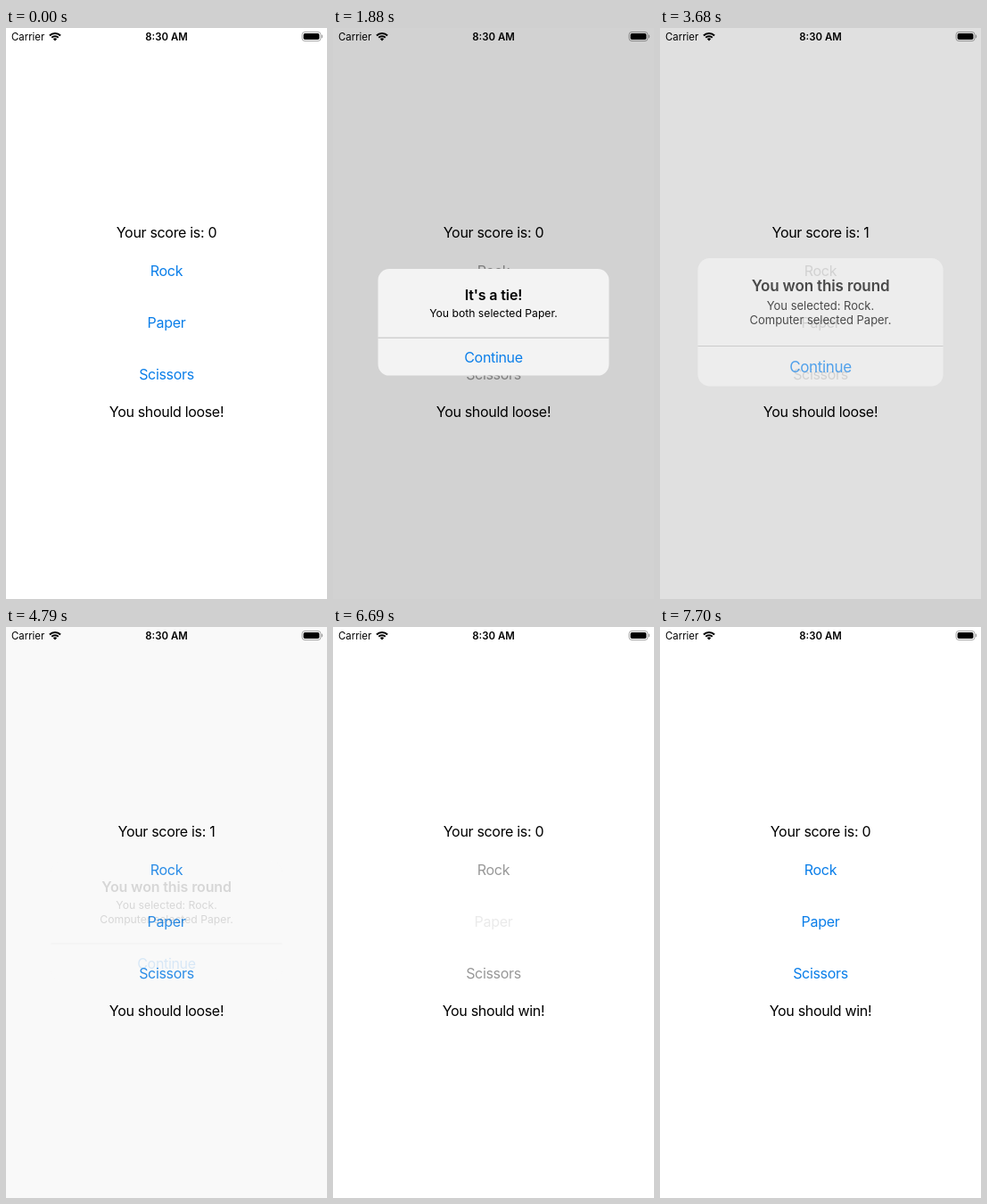
Animation, 360 px wide and 640 px high, one loop 7.78 s. Source, as an HTML page with a canvas:

```html
<!DOCTYPE html>
<html lang="en">
<head>
<meta charset="utf-8">
<title>Rock Paper Scissors</title>
<style>
  html, body { margin: 0; width: 100%; height: 100%; overflow: hidden; background: #fff; }
  canvas { display: block; width: 360px; height: 640px; }
</style>
</head>
<body>
<canvas id="stage"></canvas>
<script>
const W = 360, H = 640, MID = W / 2, LOOP = 7780;
const BLUE = '#0a7ee9', GREY = '#989898';
const FAMILY = 'Inter, "Liberation Sans", sans-serif';
const DIM = 0.176;
const SHOW_RATE = 0.0222, HIDE_RATE = 0.026, HIDE_LEAD = 28;
const canvas = document.getElementById('stage');
const ctx = canvas.getContext('2d');
const dpr = window.devicePixelRatio || 1;
canvas.width = W * dpr;
canvas.height = H * dpr;

const buttons = [['Rock', 277.6], ['Paper', 335.6], ['Scissors', 393.6]];
const tie = { title: "It's a tie!", lines: ['You both selected Paper.'] };
const won = { title: 'You won this round', lines: ['You selected: Rock.', 'Computer selected Paper.'] };
const lost = { title: 'You lost this round', lines: ['You selected: Scissors.', 'Computer selected Paper.'] };

// show and hide are [first step, last step, number of steps]
const rounds = [
  { pick: 1, press: 1240, show: [1540, 1880, 4], hide: [2560, 2990, 5], score: 0, alert: tie },
  { pick: 0, press: 3460, show: [3570, 4000, 5], hide: [4570, 4890, 4], score: 1, alert: won },
  { pick: 2, press: 5230, show: [5330, 5750, 5], hide: [5950, 6280, 4], score: 0, alert: lost },
  { pick: 1, press: 6580, show: [6690, 7100, 5], hide: [7250, 7700, 5], score: 0, alert: tie }
];
const GOAL_CHANGE = 6280;

// Critically damped spring from 0 to 1
function spring(ms, rate) {
  const x = Math.max(0, ms) * rate;
  return 1 - (1 + x) * Math.exp(-x);
}

function stepOf(t, [from, to, count]) {
  const size = (to - from) / (count - 1);
  const index = Math.min(count - 1, Math.floor((t - from) / size + 1e-6));
  return { size, index, last: index === count - 1 };
}

function stateAt(t) {
  const s = { score: 0, goal: t < GOAL_CHANGE ? 'loose' : 'win', tint: BLUE,
              pressed: -1, alert: null, level: 0, scale: 1, held: false };
  for (const r of rounds) {
    if (t < r.press) break;
    if (t < r.show[0]) {
      s.pressed = r.pick;
      break;
    }
    s.score = r.score;
    if (t < r.hide[0]) {
      const { size, index } = stepOf(t, r.show);
      const fromEnd = r.show[2] - 1 - index;
      s.level = fromEnd ? spring((4 - fromEnd) * size, SHOW_RATE) : 1;
      s.scale = 1 + 0.2 * (1 - s.level);
      s.tint = GREY;
      s.alert = r.alert;
      if (s.level === 0) s.pressed = r.pick;
      break;
    }
    const { size, index, last } = stepOf(t, r.hide);
    if (last) continue;
    s.alert = r.alert;
    s.held = index === 0;
    s.tint = s.held ? GREY : BLUE;
    s.level = s.held ? 1 : 1 - spring((index - 1) * size + HIDE_LEAD, HIDE_RATE);
    break;
  }
  return s;
}

function text(str, y, { x = MID, size = 16, weight = 400, color = '#000', track = 0, align = 'center' } = {}) {
  ctx.font = `${weight} ${size}px ${FAMILY}`;
  ctx.letterSpacing = `${track * size}px`;
  ctx.textAlign = align;
  ctx.fillStyle = color;
  ctx.fillText(str, x, y);
}

function roundRect(x, y, w, h, r) {
  ctx.beginPath();
  ctx.roundRect(x, y, w, h, r);
}

function statusBar() {
  text('Carrier', 14, { x: 6, size: 11.4, align: 'left' });
  text('8:30 AM', 14, { size: 11.4, weight: 600 });

  const a = -Math.PI * 0.75, b = -Math.PI * 0.25;
  ctx.strokeStyle = ctx.fillStyle = '#000';
  ctx.lineWidth = 2;
  for (const r of [8.6, 5.3]) {
    ctx.beginPath();
    ctx.arc(55, 14.5, r, a, b);
    ctx.stroke();
  }
  ctx.beginPath();
  ctx.moveTo(55, 14.5);
  ctx.arc(55, 14.5, 3.1, a, b);
  ctx.fill();

  ctx.strokeStyle = ctx.fillStyle = '#a6a6a6';
  ctx.lineWidth = 1;
  roundRect(332, 4.5, 21, 10, 3);
  ctx.stroke();
  roundRect(353.8, 7.6, 1.4, 3.8, [0, 1.4, 1.4, 0]);
  ctx.fill();
  ctx.fillStyle = '#000';
  roundRect(333.6, 6, 17.8, 7, 1.8);
  ctx.fill();
}

function drawAlert({ alert, level, scale, held }) {
  const w = 259, h = 104 + 15.5 * alert.lines.length;
  const left = -w / 2, top = -h / 2, line = top + h - 42.5;
  ctx.save();
  ctx.globalAlpha = level;
  ctx.translate(MID, 329.8);
  ctx.scale(scale, scale);
  ctx.fillStyle = '#f3f3f3';
  roundRect(left, top, w, h, 12.5);
  ctx.fill();
  if (held) {
    ctx.fillStyle = '#e2e2e2';
    roundRect(left, line, w, 42.5, [0, 0, 12.5, 12.5]);
    ctx.fill();
  }
  ctx.fillStyle = '#b4b4b4';
  ctx.fillRect(left, line - 0.3, w, 0.8);
  text(alert.title, top + 34.9, { x: 0, weight: 600, track: -0.008 });
  alert.lines.forEach((str, i) => text(str, top + 54.1 + i * 15.5, { x: 0, size: 12.2 }));
  text('Continue', top + h - 14.6, { x: 0, color: BLUE, track: -0.02 });
  ctx.restore();
}

function draw(t) {
  const s = stateAt(t);
  ctx.setTransform(dpr, 0, 0, dpr, 0, 0);
  ctx.fillStyle = '#fff';
  ctx.fillRect(0, 0, W, H);

  statusBar();
  text(`Your score is: ${s.score}`, 235, { track: -0.02 });
  buttons.forEach(([name, y], i) => {
    ctx.globalAlpha = i === s.pressed ? 0.2 : 1;
    text(name, y, { color: s.tint, track: -0.02 });
  });
  ctx.globalAlpha = 1;
  text(`You should ${s.goal}!`, 436.4, { track: -0.02 });

  if (s.alert && s.level > 0) {
    ctx.fillStyle = `rgba(0, 0, 0, ${DIM * s.level})`;
    ctx.fillRect(0, 0, W, H);
    drawAlert(s);
  }
}

const start = performance.now();
function tick() {
  draw((performance.now() - start) % LOOP);
  requestAnimationFrame(tick);
}
tick();
</script>
</body>
</html>
```
